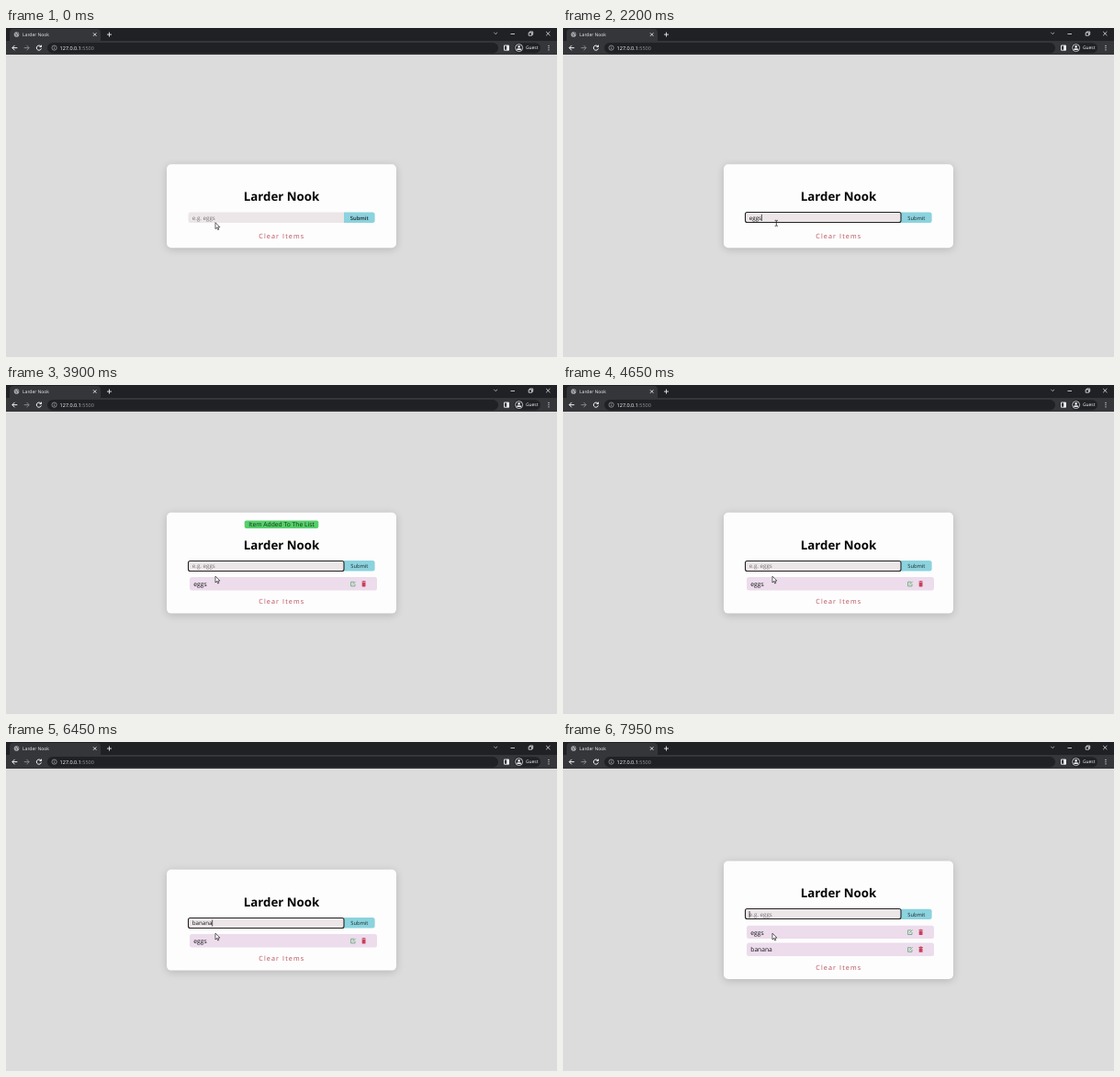
An HTML page with a canvas that plays this animation: 600 px wide and 358 px high, repeating every 8000 ms.

```html
<!DOCTYPE html>
<html lang="en">
<head>
<meta charset="utf-8">
<title>Larder Nook</title>
<style>
  html, body { margin: 0; width: 100%; height: 100%; overflow: hidden; background: #dcdcdc; }
  canvas { display: block; }
</style>
</head>
<body>
<canvas id="stage" width="600" height="358"></canvas>
<script>
const ctx = document.getElementById('stage').getContext('2d');
const LOOP = 8000, BLINK = 530, ALERT = 1000, FOCUS = 750;
const NAME = 'Larder Nook';

// Each entry: when its keys are pressed and when it joins the list.
const entries = [
  { word: 'eggs', keys: [1300, 1500, 1690, 1930], added: 3600 },
  { word: 'banana', keys: [5560, 5740, 5900, 6080, 6250, 6420], added: 6850 }
];

function box(x, y, w, h, radius, fill) {
  ctx.beginPath();
  ctx.roundRect(x, y, w, h, radius);
  ctx.fillStyle = fill;
  ctx.fill();
}

function text(str, x, y, size, color, { align = 'left', weight = 400, spacing = 0 } = {}) {
  ctx.font = `${weight} ${size}px "Open Sans", "Noto Sans", sans-serif`;
  ctx.textRendering = 'geometricPrecision';
  ctx.textAlign = align;
  ctx.letterSpacing = spacing + 'px';
  ctx.fillStyle = color;
  ctx.fillText(str, x, y);
  return ctx.measureText(str).width;
}

function path(d, color, width = 0.9) {
  ctx.strokeStyle = color;
  ctx.lineWidth = width;
  ctx.stroke(new Path2D(d));
}

function disc(x, y, r, fill) {
  ctx.beginPath();
  ctx.arc(x, y, r, 0, 7);
  ctx.fillStyle = fill;
  ctx.fill();
}

function drawBrowser() {
  box(0, 0, 600, 15, 0, '#202124');
  box(4, 1, 99, 16, 4, '#35363a');
  box(0, 14, 600, 15, 0, '#35363a');
  disc(11.5, 7, 2.8, '#a6a9ad');
  path('M9.5 5.8l2 1.2-.5 2M12 4.6l1 1.8 1 .2', '#484a4e', 0.7);
  text(NAME, 18, 8.9, 5, '#f1f3f4', { weight: 500 });
  path('M95 5.4l3.4 3.4M98.4 5.4l-3.4 3.4', '#e8eaed');
  path('M110 7.1h5M112.5 4.6v5', '#e8eaed');
  path('M531.3 4.8l1.9 1.9 1.9-1.9', '#c4c7cb', 0.8);
  path('M549.5 6.5h4.5M569.2 5h3.4v3.2h-3.4zM570.4 5v-1h3.3v3.2h-1M588.2 4l4.2 4.2M592.4 4l-4.2 4.2', '#e8eaed', 0.8);

  path('M12.3 21.6H7M9.5 18.9l-2.7 2.7 2.7 2.7', '#f1f3f4', 1);
  path('M19.7 21.6H25M22.5 18.9l2.7 2.7-2.7 2.7', '#85878b', 1);
  path('M38 20.1a2.6 2.6 0 1 0 .4 2.2M38.5 18.6v2h-2', '#f1f3f4', 1);
  box(45, 16, 491, 11.4, 5.7, '#202124');
  path('M55.2 21.6a2.6 2.6 0 1 0-5.2 0a2.6 2.6 0 1 0 5.2 0M52.6 21.2v1.8M52.6 19.8v.7', '#aeb1b5', 0.7);
  const host = text('127.0.0.1', 58.6, 23.5, 5.5, '#fff', { weight: 500 });
  text(':5500', 58.6 + host, 23.5, 5.5, '#92969b');
  path('M542.5 19h5v5.2h-5z', '#f1f3f4', 0.9);
  box(545.2, 19, 2.3, 5.2, 0, '#f1f3f4');
  box(553, 16.2, 29, 11, 5.5, '#202124');
  path('M562.6 21.6a4 4 0 1 0-8 0a4 4 0 1 0 8 0', '#e8eaed', 0.8);
  disc(558.6, 20.4, 1.3, '#e8eaed');
  box(556.2, 22.3, 4.8, 1.8, 1, '#e8eaed');
  text('Guest', 566, 23.4, 4.9, '#fff', { weight: 500 });
  for (const y of [19.4, 21.6, 23.8]) disc(591, y, 0.65, '#e8eaed');
}

function drawItem(word, y) {
  box(200, y - 7.2, 204, 14.4, 2.5, '#ecdcec');
  text(word, 204.3, y + 2.6, 6.7, '#111');
  path(`M379 ${y - 2}h-3.4v4.6h4.4v-2.4M377.4 ${y + 0.8}l3.2-3.3`, '#67ad7c', 0.9);
  box(387.4, y - 2.7, 4.4, 1, 0.3, '#c9405a');
  box(388.6, y - 3.2, 2, 0.8, 0.2, '#c9405a');
  box(387.7, y - 1.4, 3.8, 4.5, 0.6, '#c9405a');
}

function drawInput(top, t, typed, lastReset) {
  const y = top + 52.3, focused = t >= FOCUS;
  box(198.5, y, 169.8, 11.4, [2.5, 0, 0, 2.5], '#ece6e8');
  box(368, y, 33.6, 11.4, [0, 2.5, 2.5, 0], '#8bd3de');
  text('Submit', 384.8, top + 60.4, 5.8, '#20282b', { align: 'center', weight: focused ? 400 : 600 });
  if (focused) {
    ctx.beginPath();
    ctx.roundRect(198.5, Math.floor(y) + 0.5, 169.5, 11, 2);
    ctx.strokeStyle = '#222';
    ctx.lineWidth = 1.1;
    ctx.stroke();
  }
  const width = text(typed || 'e.g. eggs', 202.8, top + 60.5, 6.2, typed ? '#111' : '#77737a');
  const caretOn = (t - lastReset) % (2 * BLINK) < BLINK;
  if (focused && caretOn) box(202.7 + (typed ? width : 0), top + 54.6, 0.7, 7.2, 0, '#111');
}

function drawPointer(t, beam) {
  if (beam) {
    path('M230.7 209.4h1.1l.5.4.5-.4h1.1M232.3 209.8v5.2M230.7 215.4h1.1l.5-.4.5.4h1.1', '#222', 0.8);
    return;
  }
  const move = Math.min(1, Math.max(0, (t - 250) / 300));
  const y = 211.7 - 3.6 * move * move * (3 - 2 * move);
  ctx.save();
  ctx.translate(228, y);
  const arrow = new Path2D('M0 0v6.9l1.6-1.5 1.1 2.5 1.1-.5-1.1-2.4h2.2z');
  ctx.fillStyle = '#fff';
  ctx.fill(arrow);
  ctx.strokeStyle = '#222';
  ctx.lineWidth = 0.7;
  ctx.stroke(arrow);
  ctx.restore();
}

function draw(t) {
  const items = entries.filter(e => t >= e.added);
  const current = entries.find(e => t < e.added);
  const typed = current ? current.word.slice(0, current.keys.filter(k => t >= k).length) : '';
  const resets = [FOCUS, ...entries.flatMap(e => e.keys)].filter(k => t >= k);
  const height = 91 + 18.8 * items.length;
  const top = 193.7 - height / 2;

  box(0, 0, 600, 358, 0, '#dcdcdc');
  drawBrowser();

  ctx.save();
  ctx.shadowColor = 'rgba(0,0,0,.17)';
  ctx.shadowBlur = 8;
  ctx.shadowOffsetY = 1.8;
  box(175, top, 250, height, 5, '#fdfdfd');
  ctx.restore();

  if (items.some(e => t < e.added + ALERT)) {
    box(259.7, top + 8.6, 80.6, 8.6, 2, '#55d06a');
    text('Item Added To The List', 300, top + 15.5, 6.75, '#14301a', { align: 'center' });
  }
  text(NAME, 300, top + 40, 13.3, '#050505', { align: 'center', weight: 700 });
  drawInput(top, t, typed, resets.at(-1) ?? 0);
  items.forEach((e, i) => drawItem(e.word, top + 77.5 + 18.8 * i));
  text('Clear Items', 275.3, top + 80.5 + 18.8 * items.length, 7.2, '#b84c57', { spacing: 1.1 });
  drawPointer(t, t >= 500 && !items.length);
}

const start = performance.now();
function tick() {
  draw((performance.now() - start) % LOOP);
  requestAnimationFrame(tick);
}
tick();
</script>
</body>
</html>
```
